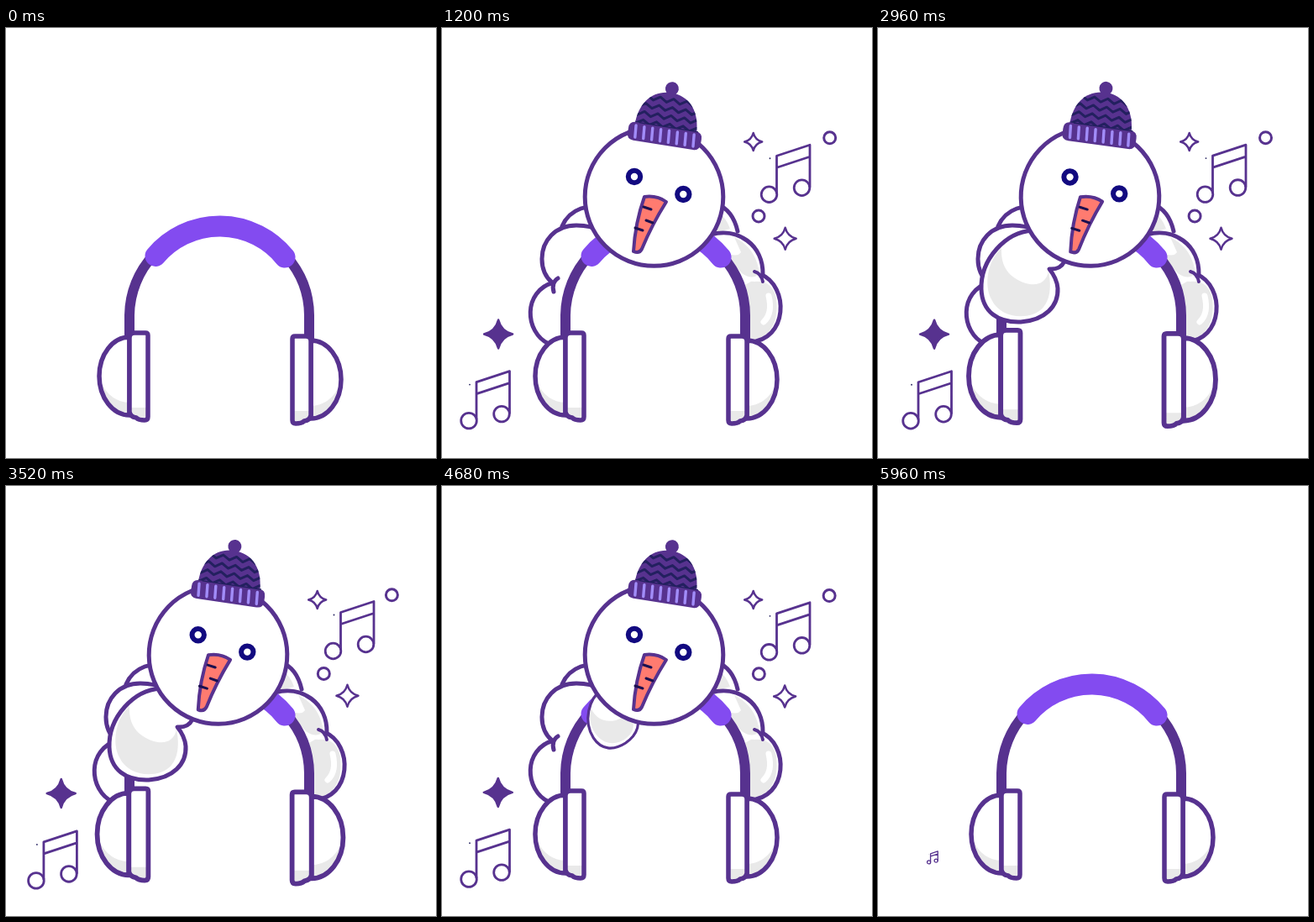
Write an HTML page with a canvas that moves like this. It is 512x512 px and loops after 6000 ms.

```html
<!DOCTYPE html>
<html lang="en">
<head>
<meta charset="utf-8">
<title>Snowman with headphones</title>
<style>
html, body { margin: 0; width: 100%; height: 100%; overflow: hidden; background: #fff; }
canvas { display: block; }
</style>
</head>
<body>
<canvas id="stage" width="512" height="512"></canvas>
<script>
const ctx = document.getElementById('stage').getContext('2d');
const LOOP = 6000;
const INK = '#57328f', BAND = '#834bf0', NAVY = '#23205f', SHADE = '#e9e9e9', WHITE = '#fff';
ctx.lineCap = ctx.lineJoin = 'round';

const clamp = u => Math.max(0, Math.min(1, u));

// Smooth step from 0 to 1 between two times
function ease(t, from, to) {
  const u = clamp((t - from) / (to - from));
  return u * u * (3 - 2 * u);
}

// Grows from 0 to 1 with a small overshoot
function pop(t, from, length) {
  const u = clamp((t - from) / length) - 1;
  return u <= -1 ? 0 : 1 + 2.2 * u ** 3 + 1.2 * u ** 2;
}

function draw(d, fill, stroke, width) {
  const p = new Path2D(d);
  if (fill) { ctx.fillStyle = fill; ctx.fill(p); }
  if (stroke) { ctx.strokeStyle = stroke; ctx.lineWidth = width; ctx.stroke(p); }
}

const line = (d, width = 5, color = INK) => draw(d, null, color, width);

function dot(x, y, r, fill, stroke, width) {
  draw(`M${x + r} ${y}A${r} ${r} 0 1 1 ${x - r} ${y}A${r} ${r} 0 1 1 ${x + r} ${y}Z`, fill, stroke, width);
}

function group(paint) {
  ctx.save();
  paint();
  ctx.restore();
}

// Scale and turn around a fixed point
function about(x, y, scale, angle = 0) {
  ctx.translate(x, y);
  ctx.rotate(angle * Math.PI / 180);
  ctx.scale(scale, scale);
  ctx.translate(-x, -y);
}

function leftBody() {
  const top = 'M143 236C152 215 175 208 198 215';
  const low = 'M133 303C96 313 98 362 127 376';
  const mid = 'M187 242C181 237 170 235 160 235C135 235 119 253 119 275C119 289 124 297 131 303';
  draw(top + 'L220 260L180 270Z', WHITE);
  line(top);
  draw(low + 'H170L165 300Z', WHITE);
  line(low);
  draw(mid + 'L150 310L195 262Z', WHITE);
  line(mid + 'M138 298Q130 303 133 314');
  line('M197 203Q200 213 190 223M192 216Q198 214 205 216M218 217V227');
}

function rightBody() {
  const top = 'M292 212C312 200 344 206 352 242';
  const low = 'M379 293C414 307 412 372 366 374';
  const mid = 'M320 246C352 237 383 258 382 294';
  draw(top + 'L320 260Z', WHITE);
  draw('M290 219C314 209 334 214 343 239L325 244Z', SHADE);
  line(top);
  draw(low + 'L345 300Z', WHITE);
  draw('M372 302C390 300 396 312 398 322C402 350 390 371 366 371L355 300Z', SHADE);
  line('M389 319Q394 340 383 350', 7, WHITE);
  line(low);
  draw(mid + 'L350 312L310 270Z', WHITE);
  draw('M348 249C367 259 375 272 378 292Q370 301 357 292Q340 274 328 262Q350 276 356 267Z', SHADE);
  line(mid);
  line('M372 290Q380 292 382 302', 4);
}

function body(t, lean) {
  group(() => {
    about(254, 400, .5 + .5 * ease(t, 520, 860));
    rightBody();
    ctx.translate(4 - 4 * lean, 3 - 3 * lean);
    leftBody();
  });
}

function hat() {
  const dome = 'M-37 -8C-37 -35 -22 -52 0 -52S37 -35 37 -8Z';
  ctx.translate(265, 128.5);
  ctx.rotate(9 * Math.PI / 180);
  dot(0, -57, 8, INK);
  draw(dome, INK);
  group(() => {
    ctx.clip(new Path2D(dome));
    for (let y = -45; y < -10; y += 10) {
      let d = `M-44 ${y}`;
      for (let i = 1; i < 12; i++) d += `l8 ${i % 2 ? 5 : -5}`;
      line(d, 3, NAVY);
    }
  });
  draw('M-36 -11H36Q44 -11 44 -3V3Q44 11 36 11H-36Q-44 11 -44 3V-3Q-44 -11 -36 -11Z', INK);
  line('M-32 -11H38', 1.4, NAVY);
  for (let x = -35; x <= 35; x += 10) line(`M${x - .5} -7L${x + .5} 7`, 3.4, '#a18cf8');
}

function head(t, lean) {
  const drop = 239 * (1 - ease(t, 500, 860));
  group(() => {
    ctx.translate(0, drop - 62 * (1 - lean));
    about(252.5, 201, 1, 19.8 * (1 - lean) - 1.1 * ease(t, 1920, 2900));
    dot(252.5, 201, 82.3, WHITE, INK, 5);
    for (const [x, y] of [[229, 177], [287.3, 198]]) dot(x, y, 7.2, WHITE, '#120a80', 6);
    draw('M241 201Q256 199 267 207Q250 234 238 263Q235 269 228 266Q230 232 241 201Z', '#ff7b70', INK, 4);
    line('M240 213L249 216M243 229L251 232M230 238L239 241', 3, '#1b1050');
    hat();
  });
}

function bands() {
  draw('M147 342A107 107 0 0 1 361 342V468H147Z', WHITE);
  line('M147 368V342A107 107 0 0 1 176 270M361 372V342A107 107 0 0 0 334 272', 12);
  line('M178 271.5A100 100 0 0 1 332 273', 25, BAND);
}

function cup(scale) {
  const shell = 'M147 368A36 46.5 0 0 0 147 461Z';
  const plate = 'M147 369Q147 363 153 363H166Q169 363 169 366V463Q169 467 165 467Q158 467 155 464Q148 463 147 457Z';
  group(() => {
    about(161, 415, scale);
    draw(shell, WHITE);
    draw('M113 422Q124 445 147 446V461Q119 457 113 422Z', SHADE);
    line(shell, 5.5);
    draw(plate, WHITE);
    draw('M149 452H167V464Q155 464 149 459Z', SHADE);
    line(plate, 5.5);
  });
}

function cups(t) {
  const size = 1 + .06 * ease(t, 1200, 2960);
  cup(size);
  group(() => {
    ctx.translate(510, 4);
    ctx.scale(-1, 1);
    cup(size);
  });
}

function arm(t) {
  const size = pop(t, 1240, 400);
  if (!size) return;
  const edge = 'M184 241C152 243 122 275 123 311C124 338 143 351 170 350C199 348 215 331 214 310Q213 298 204 287Q217 288 222 278';
  group(() => {
    about(195, 235, size, 35 * ease(t, 1240, 1600) - 35);
    draw(edge + 'L230 240Z', WHITE);
    draw('M147 262C130 278 126 306 135 323C143 341 166 347 184 341C203 335 208 314 203 290C200 303 190 308 176 304C156 297 146 285 147 262Z', SHADE);
    line(edge);
  });
}

// Two joined notes, growing around (px, py)
function note(x, y, px, py, scale) {
  if (!scale) return;
  const width = 2.8 / Math.sqrt(scale);
  group(() => {
    ctx.translate(x, y);
    about(px, py, scale);
    line('M399 196V152L438.5 139V189M399 166L438.5 153', width);
    dot(390, 198, 9.3, null, INK, width);
    dot(429, 190, 9.3, null, INK, width);
    dot(391, 155, .9, NAVY);
  });
}

function star(x, y, r, fill) {
  const q = r * .2;
  group(() => {
    ctx.translate(x, y);
    draw(`M0 ${-r}Q${q} ${-q} ${r} 0Q${q} ${q} 0 ${r}Q${-q} ${q} ${-r} 0Q${-q} ${-q} 0 ${-r}Z`, fill, INK, 2.5);
  });
}

function sparkles(t) {
  const sway = Math.cos((t - 600) / 3000 * 2 * Math.PI);
  const size = pop(t, 70, 130);
  note(7 * ease(t, 1920, 2960) - 358, 270.3 - 2.3 * sway, 426.6, 173, pop(t, 30, 160));
  note(-.5, 1.7 * sway - .3, 414, 172, size);
  if (!size) return;
  star(370.7, 135.5, 10.5 * size, WHITE);
  star(408 + 2.2 * sway, 250.5 + sway, 13 * size, WHITE);
  star(66.7 + 1.4 * sway, 365 - 1.5 * sway, 17 * size, INK);
  dot(461 + 2.3 * sway, 130.5 + sway, 7 * size, null, INK, 3);
  dot(377.4 - 1.3 * sway, 223.8 + .5 * sway, 7 * size, null, INK, 3);
}

function render(now) {
  const phase = now % LOOP;
  const t = Math.min(phase, LOOP - phase); // plays forward, then back
  const lean = ease(t, 890, 1160);
  ctx.fillStyle = WHITE;
  ctx.fillRect(0, 0, 512, 512);
  body(t, lean);
  if (!lean) head(t, lean);
  bands();
  cups(t);
  arm(t);
  if (lean) head(t, lean);
  sparkles(t);
}

const start = performance.now();
function tick() {
  render(performance.now() - start);
  requestAnimationFrame(tick);
}
tick();
</script>
</body>
</html>
```
